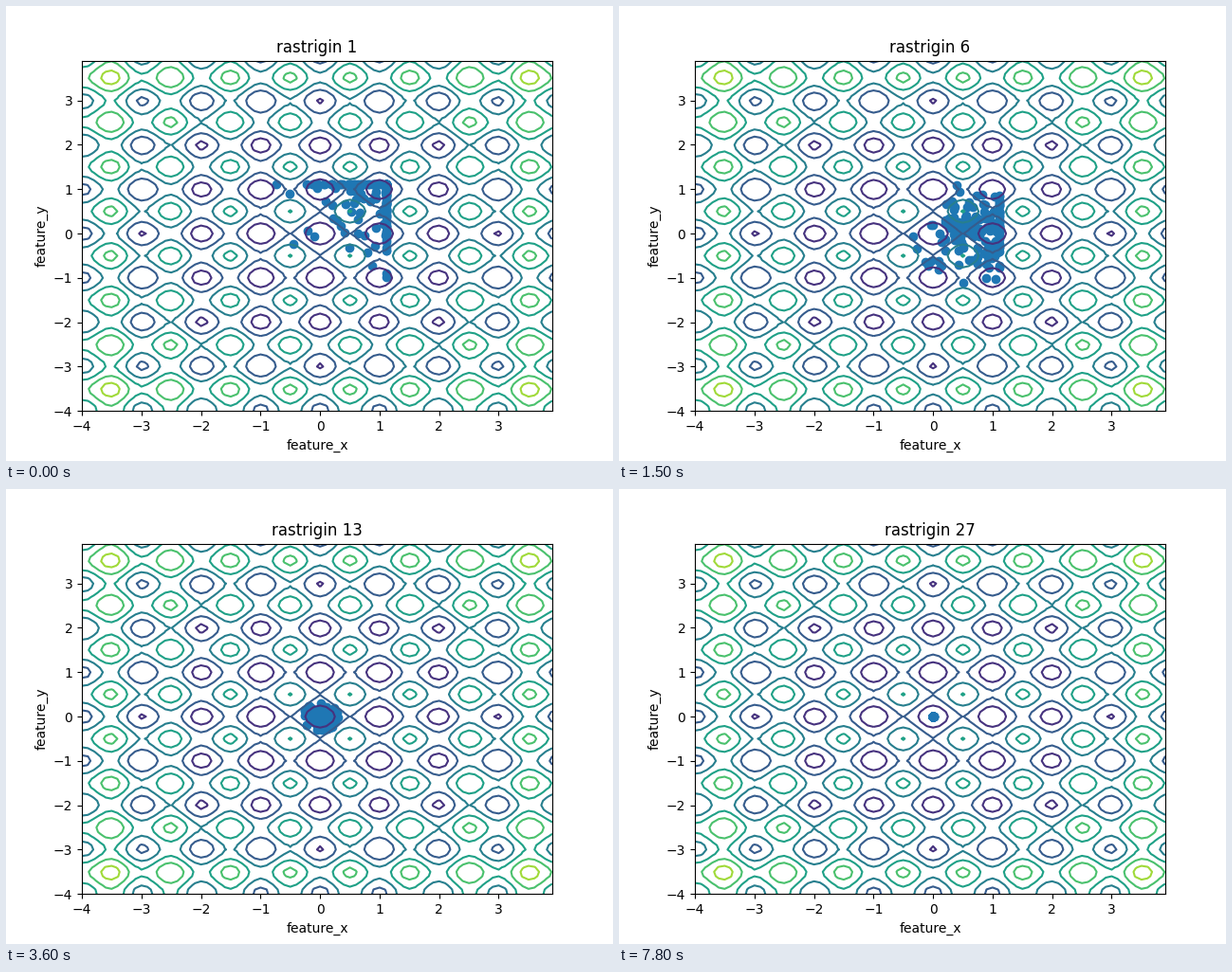
Write a matplotlib script that moves like this. It is 640 by 480 pixels and loops after 8 s.

```python
import matplotlib.pyplot as plt
import numpy as np
from matplotlib.animation import FuncAnimation

BOUND = 1.12
POPULATION = 150
MAX_RADIUS = 2.5
TICKS_PER_GENERATION = 3
TICK_MS = 100
TICKS = 80
CENTRED = 9  # generation at which the swarm reaches the origin


def rastrigin(x, y):
    return 20 + x**2 + y**2 - 10 * (np.cos(2 * np.pi * x) + np.cos(2 * np.pi * y))


def centre(generation):
    """Slide along the right wall, then jump over to the origin."""
    x = np.interp(generation, [1, 6, CENTRED], [1.2, 0.85, 0])
    y = np.interp(generation, [1, 4], [0.9, 0])
    return np.array([x, y])


def spread(generation):
    """Shrink slowly while searching and faster once centred."""
    searching = min(generation, CENTRED) - 1
    converging = max(generation - CENTRED, 0)
    return 0.8 * 0.9**searching * 0.77**converging


def population(generation):
    rng = np.random.default_rng(generation)
    offsets = rng.normal(size=(POPULATION, 2))
    radius = np.hypot(*offsets.T)[:, None]
    offsets *= np.minimum(1, MAX_RADIUS / radius)
    points = centre(generation) + spread(generation) * offsets
    return np.clip(points, -BOUND, BOUND)


fig, ax = plt.subplots(figsize=(6.4, 4.8), dpi=100)
axis = np.arange(-4, 4, 0.1)
grid_x, grid_y = np.meshgrid(axis, axis)
# The tiny lift keeps minima that lie exactly on a level from drawing as dots.
ax.contour(grid_x, grid_y, rastrigin(grid_x, grid_y) + 1e-9)
swarm = ax.scatter([], [], color="#1f77b4")
ax.set(xlim=(axis[0], axis[-1]), ylim=(axis[0], axis[-1]),
       xlabel="feature_x", ylabel="feature_y")
title = ax.set_title("")


def draw(tick):
    generation = 1 + tick // TICKS_PER_GENERATION
    swarm.set_offsets(population(generation))
    title.set_text(f"rastrigin {generation}")
    return swarm, title


animation = FuncAnimation(fig, draw, frames=TICKS, interval=TICK_MS,
                          init_func=lambda: draw(0), repeat=True, repeat_delay=0)
plt.show()
```
